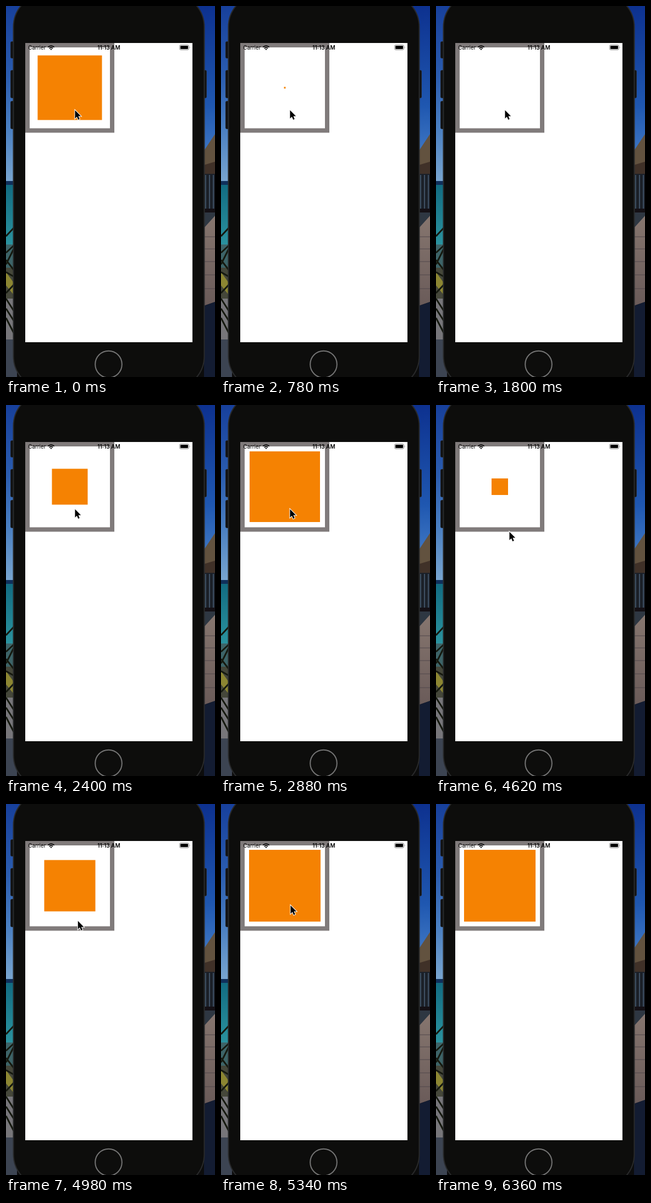
An HTML page for the animation above (6420 ms loop, 380 by 672 pixels).

```html
<!DOCTYPE html>
<html lang="en">
<head>
<meta charset="utf-8">
<title>Scaling square</title>
<style>
html, body { margin: 0; width: 100%; height: 100%; overflow: hidden; background: #0c0c0c; }
svg { display: block; }
text { font-family: Inter, Roboto, sans-serif; font-size: 9.8px; }
</style>
</head>
<body>
<svg width="380" height="672" viewBox="0 0 380 672">
  <defs>
    <linearGradient id="sky" x2="0" y2="1">
      <stop offset="0" stop-color="#17409c"/>
      <stop offset=".4" stop-color="#2b5db0"/>
      <stop offset=".7" stop-color="#4b80c2"/>
      <stop offset="1" stop-color="#79a6d0"/>
    </linearGradient>
    <linearGradient id="skyRight" x2="0" y2="1">
      <stop offset="0" stop-color="#0d318f"/>
      <stop offset=".6" stop-color="#1f57b0"/>
      <stop offset="1" stop-color="#4a83cb"/>
    </linearGradient>
    <linearGradient id="sea" x2="0" y2="1">
      <stop offset="0" stop-color="#126c82"/>
      <stop offset="1" stop-color="#2b939f"/>
    </linearGradient>
    <linearGradient id="deck" x2="0" y2="1">
      <stop offset="0" stop-color="#86766f"/>
      <stop offset="1" stop-color="#6a5b59"/>
    </linearGradient>
  </defs>

  <!-- left scenery -->
  <rect width="190" height="320" fill="url(#sky)"/>
  <rect y="317" width="20" height="8" fill="#10305c"/>
  <rect y="324" width="20" height="110" fill="url(#sea)"/>
  <rect y="432" width="20" height="42" fill="#3d6468"/>
  <rect y="474" width="20" height="56" fill="#45473a"/>
  <rect y="530" width="20" height="74" fill="#77767a"/>
  <rect y="604" width="20" height="68" fill="#3c4452"/>
  <path d="M0 482L13 500V522L0 506Z" fill="#8c8632"/>
  <path d="M0 417L14 402M0 447L14 434M0 468L14 440M0 460L14 478M0 482L14 490M0 520L14 505M0 530L14 552M0 548L14 570M0 565L14 592" stroke="#15190f" stroke-width="3"/>

  <!-- right scenery -->
  <rect x="190" width="190" height="300" fill="url(#skyRight)"/>
  <path d="M360 262L380 232V300H360Z" fill="#62523f"/>
  <path d="M360 288L380 282V306H360Z" fill="#403128"/>
  <rect x="360" y="304" width="20" height="68" fill="#1b2028"/>
  <path d="M363 306V370M370 306V370M377 306V370" stroke="#3e5064" stroke-width="2"/>
  <rect x="360" y="367" width="20" height="8" fill="#141015"/>
  <rect x="360" y="374" width="20" height="30" fill="#2e3742"/>
  <path d="M360 402L380 380V536L360 543Z" fill="url(#deck)"/>
  <path d="M360 418H380M360 440H380M360 463H380M360 487H380M360 512H380" stroke="#51474a"/>
  <path d="M360 543L380 536V672H360Z" fill="#131c32"/>

  <!-- phone -->
  <g fill="#111214" stroke="#25272a">
    <rect x="8.500" y="64.500" width="7" height="30" rx="2"/>
    <rect x="8.500" y="116.500" width="7" height="50" rx="2"/>
    <rect x="8.500" y="172.500" width="7" height="50" rx="2"/>
    <rect x="358.500" y="116.500" width="6" height="50" rx="2"/>
  </g>
  <rect x="13.500" y="-22" width="347" height="716" rx="60" fill="#0d0d0c" stroke="#292a2b" stroke-width="2"/>
  <circle cx="186.500" cy="649" r="24.300" fill="#0d0d0c" stroke="#747474" stroke-width="2"/>
  <rect x="35" y="67" width="304" height="542" fill="#fff"/>
  <rect x="39" y="71" width="154" height="154.500" fill="none" stroke="#807b7b" stroke-width="8"/>
  <rect id="square" fill="#f58202"/>

  <!-- status bar -->
  <text x="40.300" y="79">Carrier</text>
  <text x="187" y="79" text-anchor="middle" font-weight="600" style="font-size:10px">11:13 AM</text>
  <g fill="none" stroke="#000" stroke-width="1.800">
    <path d="M76.300 74.600Q82 69.600 87.700 74.600M78.600 76.900Q82 73.900 85.400 76.900"/>
    <path d="M80.200 78.200Q82 76.800 83.800 78.200L82 80Z" fill="#000" stroke="none"/>
  </g>
  <rect x="315.500" y="70.500" width="17" height="9" rx="2.500" fill="none" stroke="#888"/>
  <rect x="317" y="72" width="14" height="6" rx="1"/>
  <path d="M333.800 73.500Q335.500 75 333.800 76.500Z" fill="#888"/>

  <path id="cursor" d="M0 0V15L3.400 11.800L5.800 17.200L8.300 16.100L6 10.900H10.700Z" stroke="#fff" stroke-width="2" paint-order="stroke"/>
</svg>
<script>
const LOOP = 6420, STEP = 60, DURATION = 1120, FULL = 130;
const square = document.getElementById('square');
const cursor = document.getElementById('cursor');

// each tap: start time, change of scale
const taps = [[-228, -1], [1840, 1], [3212, -1], [4264, 1]];
// cursor: time, x, y
const path = [
  [0, 125.5, 188.7], [4280, 125.5, 188.7], [4600, 133.5, 229.7], [4800, 133.5, 229.7],
  [5220, 126.5, 183.7], [5560, 126.5, 183.7], [6060, 200, 690], [LOOP, 200, 690]
];

const clamp = x => Math.min(1, Math.max(0, x));
const ease = x => (1 - Math.cos(Math.PI * clamp(x))) / 2;

function cursorAt(t) {
  const i = path.findIndex(p => p[0] > t);
  const [t0, x0, y0] = path[i - 1], [t1, x1, y1] = path[i];
  const k = ease((t - t0) / (t1 - t0));
  return [x0 + (x1 - x0) * k, y0 + (y1 - y0) * k];
}

function draw(t) {
  const scale = taps.reduce((s, [start, d]) => s + d * ease((t - start) / DURATION), 1);
  const size = Math.round(FULL * clamp(scale));
  square.setAttribute('x', 116 - size / 2);
  square.setAttribute('y', 148 - size / 2);
  square.setAttribute('width', size);
  square.setAttribute('height', size);
  cursor.setAttribute('transform', `translate(${cursorAt(t)})`);
}

const begin = performance.now();
function tick() {
  const t = (performance.now() - begin) % LOOP;
  draw(Math.floor(t / STEP) * STEP);
  requestAnimationFrame(tick);
}
tick();
</script>
</body>
</html>
```
